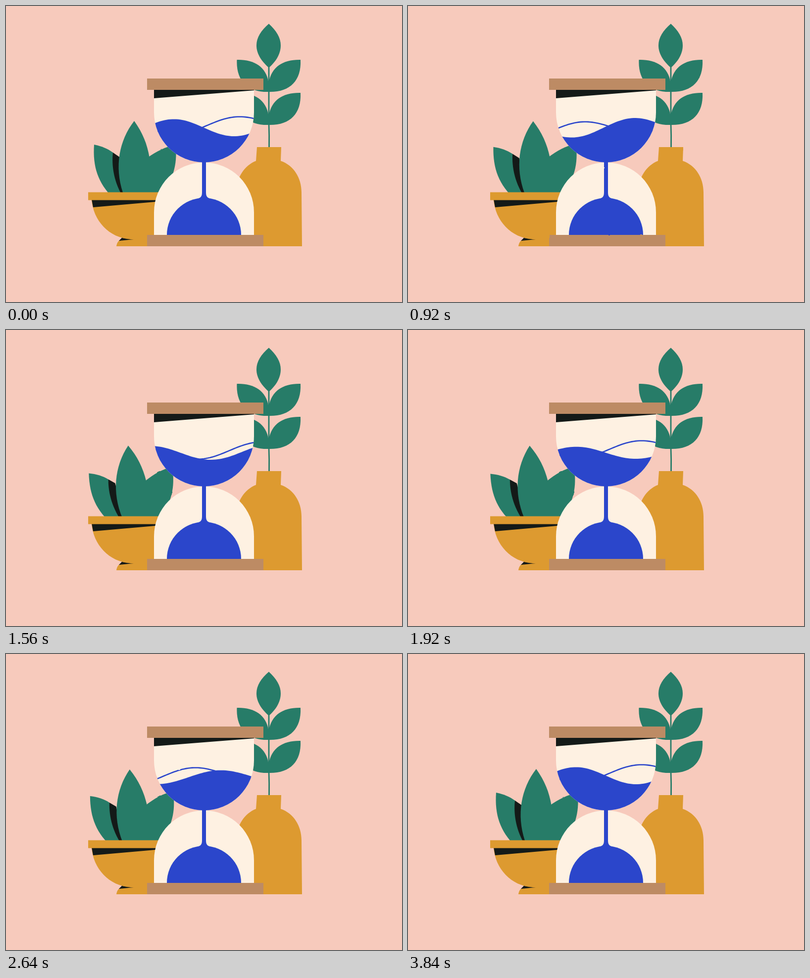
Write an HTML page that moves like this. It is 800 px wide and 600 px high and loops after 3.88 s.

```html
<!DOCTYPE html>
<html lang="en">
<head>
<meta charset="utf-8">
<title>Hourglass</title>
<style>
  html, body { margin: 0; width: 100%; height: 100%; overflow: hidden; background: #f7cabc; }
  svg { display: block; width: 800px; height: 600px; }
  .green { fill: #277c68; }
  .gold { fill: #dd9a30; }
  .wood { fill: #bd8b64; }
  .cream { fill: #fef1e2; }
  .blue { fill: #2b46cb; }
  .dark { fill: #141a18; }
  .line { fill: none; stroke: #2b46cb; stroke-width: 2.6; }
  .stem { fill: none; stroke: #277c68; stroke-width: 2.8; }
</style>
</head>
<body>
<svg viewBox="0 0 800 600">
  <defs>
    <filter id="rough" filterUnits="userSpaceOnUse" x="0" y="0" width="800" height="600" color-interpolation-filters="sRGB">
      <feTurbulence id="noise" type="fractalNoise" baseFrequency=".05" numOctaves="2" seed="3" result="n"/>
      <feDisplacementMap in="SourceGraphic" in2="n" scale="1.5" xChannelSelector="R" yChannelSelector="G"/>
    </filter>
    <path id="bulb" d="M299 168V216A101 101 0 0 0 501 216V168Z"/>
    <clipPath id="inBulb"><use href="#bulb"/></clipPath>
    <path id="leaf" d="M595 109C562 108 536 122 531 155V174C573 175 597 152 595 109Z"/>
    <g id="pair">
      <use href="#leaf"/>
      <use href="#leaf" transform="matrix(-1 0 0 1 1061.5 0)"/>
    </g>
  </defs>
  <g filter="url(#rough)">
    <!-- vase with branch -->
    <path class="stem" d="M531 120V238Q532 262 531.5 288"/>
    <g class="green">
      <path d="M531 36C515 50 506 64 506 80C506 98 518 114 531 125C544 114 555 98 555 80C555 64 546 50 531 36Z"/>
      <use href="#pair"/>
      <use href="#pair" y="67"/>
    </g>
    <path class="gold" d="M507 286H556L555 314C581 323 597 348 597 378L598 487H465V378C465 348 482 323 505 314Z"/>

    <!-- swaying plant -->
    <g data-sway="1.3">
      <path class="green" d="M178 281C193 284 205 289 216 297L236 390H217C185 358 175 325 178 281Z"/>
      <path class="dark" d="M216 297L229 306L242 390H238C218 358 213 325 216 297Z"/>
    </g>
    <path data-sway=".8" class="green" d="M285 308C305 294 322 285 343 282C346 325 338 350 310 390H270Z"/>
    <path data-sway="1" class="green" d="M259 233C228 273 219 326 236 378L240 390H290V308C285 279 276 257 259 233Z"/>

    <!-- bowl -->
    <path class="gold" d="M223 487C224 480 227 476 230 475L258 472H312V487Z"/>
    <path class="dark" d="M228 476L235 469L258 473Z"/>
    <path class="gold" d="M173 392C176 435 208 470 252 473H312V392Z"/>
    <path class="dark" d="M173 392H312V396L176 408Z"/>
    <path class="gold" d="M166 377.5H312V393.5H166Z"/>

    <!-- hourglass -->
    <use href="#bulb" class="cream"/>
    <path class="cream" d="M299 466V418A101 101 0 0 1 501 418V466Z"/>
    <path class="dark" d="M299 168H501V171L299 187Z"/>
    <g clip-path="url(#inBulb)">
      <path id="back" class="line"/>
      <path id="front" class="blue"/>
    </g>
    <g class="blue">
      <path d="M325 466V464A75 75 0 0 1 475 464V466Z"/>
      <path d="M396 314V378C396 388 392 389 383 392H417C408 389 404 388 404 378V314Z"/>
    </g>
    <path class="wood" d="M285 147H520V170H285Z"/>
    <path class="wood" d="M285 464H520V487H285Z"/>
  </g>
</svg>
<script>
  const $ = id => document.getElementById(id);
  const STEP = 40, LOOP = 3880, CYCLE = 3840, TAU = Math.PI * 2;
  const leaves = document.querySelectorAll('[data-sway]');

  // Tilted cosine across the upper bulb.
  function wave(height, tilt, amp, length, phase) {
    const pts = [];
    for (let x = -104; x <= 104; x += 4) {
      const y = height + tilt * x - amp * Math.cos(TAU * x / length - phase);
      pts.push(`${400 + x} ${y.toFixed(2)}`);
    }
    return 'M' + pts.join('L');
  }

  // The front surface runs right and swells; the back one runs left and bobs.
  function drawSand(turn) {
    const swell = Math.cos(turn - .75);
    const bob = Math.cos(2 * turn - 4.19);
    const front = wave(247.8 - 1.5 * swell, -.02, 16 + 3.5 * swell, 250, 2 * turn - 1.57);
    $('front').setAttribute('d', front + 'V320H296Z');
    $('back').setAttribute('d', wave(244.5 + 4.5 * bob, -.055, 14, 238, 1.75 - 2 * turn));
  }

  function drawPlant(turn) {
    const angle = 2.35 * (Math.cos(turn) - 1);
    for (const leaf of leaves)
      leaf.setAttribute('transform', `rotate(${angle * leaf.dataset.sway} 270 395)`);
  }

  let last = -1;
  function draw(now) {
    const frame = Math.floor(now % LOOP / STEP);
    if (frame !== last) {
      last = frame;
      const turn = TAU * frame * STEP / CYCLE;
      drawSand(turn);
      drawPlant(turn);
      // Two alternating outlines, five steps each.
      $('noise').setAttribute('seed', (frame + 9) % 10 < 5 ? 8 : 3);
    }
    requestAnimationFrame(draw);
  }
  draw(performance.now());
</script>
</body>
</html>
```
